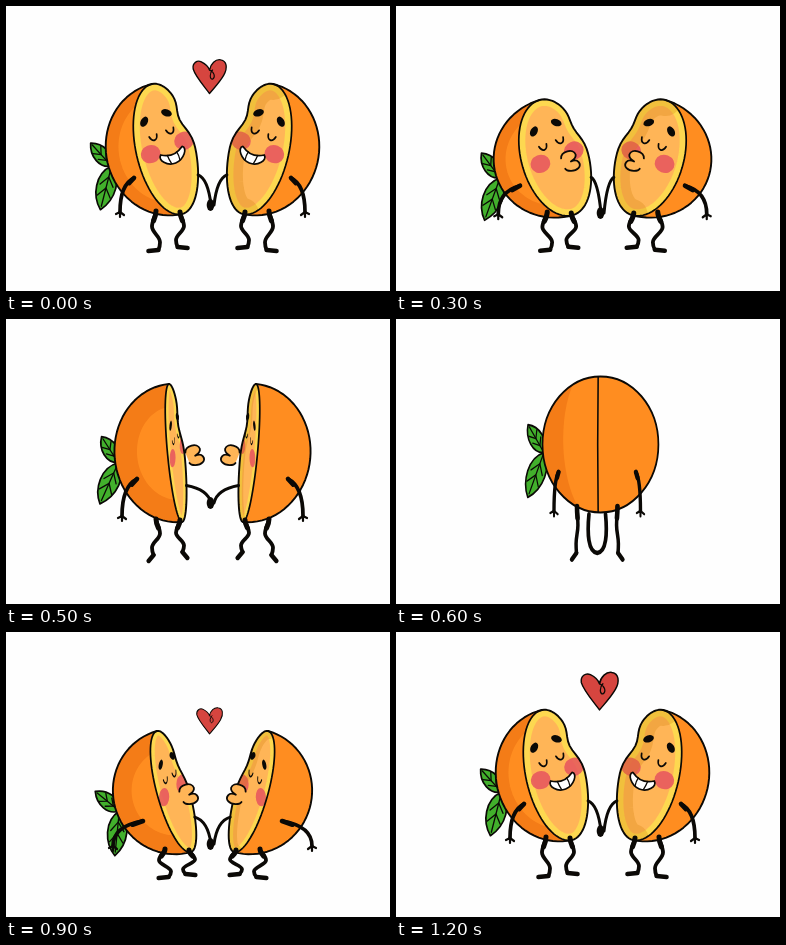
Recreate the animation shown at these times as an HTML page with a canvas. Size 384x285 px, loop 1.3 s.

```html
<!DOCTYPE html>
<html lang="en">
<head>
<meta charset="utf-8">
<title>Orange halves</title>
<style>
html, body { margin: 0; width: 100%; height: 100%; overflow: hidden; background: #fefefe; }
canvas { display: block; width: 100vw; height: 100vh; }
</style>
</head>
<body>
<canvas id="stage"></canvas>
<script>
const W = 384, H = 285, LOOP = 1300;
const INK = '#0b0906', ORANGE = '#ff8d20', SHADE = '#f47c17', YELLOW = '#fdd850', FLESH = '#ffb557',
  BLUSH = 'rgba(230, 80, 95, .82)', DIM = 'rgba(205, 125, 10, .27)', RED = '#d6453f', GREEN = '#42b02c';

const canvas = document.getElementById('stage');
const ctx = canvas.getContext('2d');
const ratio = window.devicePixelRatio || 1;
canvas.width = W * ratio;
canvas.height = H * ratio;

// A half is three arcs on one chord from top to bottom: back, rim of the cut, front with a dent.
// face: point between the eyes and how far it is turned to the viewer; stance: ground, knee bend.
const squat = {
  top: [146, 78], bottom: [176, 208], bulge: [61, 31, 28, 7], face: [156, 128, 1],
  shoulder: [128, 172], hand: [114, 206], clasp: [199], stance: [243, 4], tilt: [0]
};
const stand = {
  ...squat, top: [146, 74], bottom: [176, 204], bulge: [58, 30, 28, 7], face: [157, 124, 1],
  shoulder: [129, 171], hand: [121, 207], clasp: [197], stance: [244, .5]
};
const kiss = {
  top: [144, 90], bottom: [177, 208], bulge: [62, 34, 31, 5], face: [156, 135, 1],
  shoulder: [125, 178], hand: [106, 208], clasp: [205], stance: [243, 4], tilt: [.08]
};
const profile = {
  top: [163, 65], bottom: [176, 203], bulge: [61, 8, 9, 3], face: [170, 119, .3],
  shoulder: [131, 160], hand: [116, 197], clasp: [184], stance: [235, -4], tilt: [.17]
};
const lean = {
  top: [151, 99], bottom: [185, 220], bulge: [61, 17, 15, 3], face: [164, 145, .52],
  shoulder: [137, 189], hand: [107, 214], clasp: [212], stance: [244, 6], tilt: [-.15]
};
const mix = (a, b, k) => Object.fromEntries(Object.keys(a).map(key =>
  [key, a[key].map((v, i) => v + (b[key][i] - v) * k)]));
const wide = mix(stand, kiss, 1.25);

// when, what to draw, age of the rising heart
const steps = [
  [0, () => pair(squat, true), 2],
  [100, () => pair(squat, true), 3],
  [200, () => pair(stand, true), 4],
  [300, () => pair(wide, false)],
  [400, () => pair(kiss, false)],
  [500, () => pair(profile, false)],
  [600, () => ball(.92, 1.08)],
  [700, () => ball(1, 1)],
  [900, () => pair(lean, false), 0],
  [1000, () => pair(mix(lean, wide, .7), false), 1],
  [1100, () => pair(squat, true), 2],
  [1200, () => pair(squat, true), 3]
];

// Point on a bulging arc, u from 0 at the top to 1 at the bottom
function arcPoint({ top, bottom }, u, bulge, dent = 0) {
  const dx = bottom[0] - top[0], dy = bottom[1] - top[1], len = Math.hypot(dx, dy);
  const s = (1 - Math.cos(u * Math.PI)) / 2;
  const out = bulge * Math.sin(u * Math.PI) + dent * Math.exp(-(((s - .3) / .12) ** 2));
  return [top[0] + dx * s - dy / len * out, top[1] + dy * s + dx / len * out];
}
const arc = (pose, bulge, dent) =>
  Array.from({ length: 41 }, (_, i) => arcPoint(pose, i / 40, bulge, dent));

function line(pts, closed) {
  const path = new Path2D();
  pts.forEach(p => path.lineTo(...p));
  if (closed) path.closePath();
  return path;
}
const ring = (a, b) => line([...a, ...[...b].reverse()], true);

function stroke(path, width, color = INK) {
  ctx.lineWidth = width;
  ctx.strokeStyle = color;
  ctx.stroke(typeof path === 'string' ? new Path2D(path) : path);
}
function fill(path, color) {
  ctx.fillStyle = color;
  ctx.fill(path);
}
function oval(x, y, rx, ry, color, turn = 0) {
  const path = new Path2D();
  path.ellipse(x, y, rx, ry, turn, 0, Math.PI * 2);
  fill(path, color);
}
function local(draw, x, y, sx = 1, sy = sx, turn = 0) {
  ctx.save();
  ctx.translate(x, y);
  ctx.scale(sx, sy);
  ctx.rotate(turn);
  draw();
  ctx.restore();
}
function inside(path, draw) {
  ctx.save();
  ctx.clip(path);
  draw();
  ctx.restore();
}

function leaf(len, half, turn) {
  local(() => {
    const shape = new Path2D(
      `M0 0C${len * .2} ${-half * 1.4} ${len * .7} ${-half * 1.3} ${len} 0` +
      `C${len * .75} ${half * 1.2} ${len * .25} ${half * 1.5} 0 0Z`);
    fill(shape, GREEN);
    stroke(shape, 1.7);
    stroke(`M0 0H${len * .92}`, 1.3);
    for (const k of [.25, .5]) {
      stroke(`M${len * (k + .2)} ${-half * .7}L${len * k} 0L${len * (k + .2)} ${half * .7}`, 1.3);
    }
  }, 0, 0, 1, 1, turn);
}
function leaves(x, y, tilt) {
  local(() => {
    leaf(45, 9.5, 1.82);
    leaf(31, 7.5, -2.31);
  }, x, y, 1, 1, tilt);
}

function arm([x, y], [hx, hy]) {
  stroke(`M${x} ${y}Q${hx} ${y + (hy - y) * .2} ${hx} ${hy}`, 3.7);
  stroke(`M${x} ${y}L${x + (hx - x) * .35} ${y + (hy - y) * .15}`, 4.6);
  stroke(`M${hx - 4} ${hy + 2}L${hx} ${hy}v5M${hx} ${hy}l4 3`, 2.2);
}
// S-shaped leg; with a negative bend the feet hang
function leg(x, y, side, ground, bend) {
  const drop = ground - y, b = side * bend, foot = bend < 0 ? [5, 6] : [10, 1];
  stroke(`M${x} ${y}c0 ${drop * .1} ${b} ${drop * .25} ${b} ${drop * .4}` +
    `s${-2 * b} ${drop * .25} ${-2 * b} ${drop * .4}q0 ${drop * .1} ${b * .4} ${drop * .2}`, 3.8);
  stroke(`M${x} ${y}q0 ${drop * .1} ${b * .6} ${drop * .25}`, 5);
  stroke(`M${x - b * .6} ${ground}l${side * foot[0]} ${foot[1]}`, 4.4);
}

function onFace([x, y, w], draw) {
  local(draw, x, y, w, 1, -.38);
}
function features() {
  for (const side of [-1, 1]) {
    oval(side * 12, -18, 5.5, 3.5, INK, side * .7);
    stroke(`M${side * 9 - 4} -2q1 5 4 5t4 -5`, 1.7);
  }
}
function smile() {
  const grin = new Path2D('M-11-4Q0 4 12-4C17-1 9 9 0 9C-9 9-16 0-11-4Z');
  fill(grin, '#fff');
  stroke(grin, 1.7);
  stroke('M-5-1Q-5 4-4 8M5-1Q6 3 5 8', 1.3);
}
function pout() {
  const lips = new Path2D('M-8-4C-7-11 6-12 7-5C7-1 3 0 1 1C9-1 11 6 7 9C3 12-5 10-6 7');
  fill(lips, FLESH);
  stroke(lips, 1.8);
}

function half(pose, smiling, left) {
  const [depth, cutWidth, belly, dent] = pose.bulge, w = pose.face[2];
  const [bx, by] = pose.bottom, [clasp] = pose.clasp, [ground, bend] = pose.stance;
  const back = arc(pose, depth), rim = arc(pose, cutWidth), front = arc(pose, -belly, dent);
  const body = ring(back, front), cut = ring(rim, front);

  if (left) {
    const [x, y] = arcPoint(pose, .52, depth - 3);
    leaves(x, y, pose.tilt[0]);
  }
  fill(body, ORANGE);
  if (left) inside(body, () => stroke(line(back), (depth - cutWidth) * .85, SHADE));
  inside(cut, () => {
    fill(cut, FLESH);
    stroke(cut, 4 + 9 * w, YELLOW);
    onFace(pose.face, () => [-18, 18].forEach(x => oval(x, 14.5, 10, 9, BLUSH)));
    if (!left) stroke(line(front), 32 * w, DIM);
  });
  stroke(line(rim), 1.7);
  stroke(body, 1.9);
  onFace(pose.face, features);
  if (smiling) onFace(pose.face, () => local(smile, 2, 23));
  else local(pout, pose.face[0] + 18, pose.face[1] + 17, 1, 1, -.2);

  leg(bx - 26, by - 3, -1, ground + 1, bend);
  leg(bx - 2, by - 2, 1, ground - 2, bend);
  arm(pose.shoulder, pose.hand);
  const [x, y] = arcPoint(pose, .66, -belly);
  stroke(`M${x} ${y}Q202 ${y + 4} 205 ${clasp}`, 3);
}

function pair(pose, smiling) {
  half(pose, smiling, true);
  local(() => half(pose, smiling, false), 413, 0, -1, 1);
  oval(204.5, pose.clasp[0], 3.8, 6, INK);
}

// Both halves closed to a whole fruit
function ball(sx, sy) {
  local(() => {
    ctx.translate(-204, -126);
    leaves(143, 133, .15);
    const fruit = new Path2D();
    fruit.ellipse(204.5, 125.5, 63, 63, 0, 0, Math.PI * 2);
    fill(fruit, SHADE);
    inside(fruit, () => fill(new Path2D('M186 55C156 80 156 165 190 195H280V55Z'), ORANGE));
    stroke(fruit, 1.9);
    stroke('M202 63Q201 125 202 188', 1.7);
    stroke('M192 190C190 208 191 225 201 226C211 225 212 208 210 190', 4);
    for (const side of [-1, 1]) {
      leg(201 + side * 22, 183, side, 226, -1);
      arm([201 + side * 42, 151], [201 + side * 47, 187]);
    }
  }, 204, 126, sx, sy);
}

function heart() {
  const shape = new Path2D(
    'M0 34C-6 26-14 17-16 10C-17 4-12 1-8 3C-4 5-1 8 0 11C1 5 6 0 11 1C17 2 18 9 14 16C10 23 5 28 0 34Z');
  fill(shape, RED);
  stroke(shape, 1.3);
  stroke('M0 11C5 13 6 18 3 20C0 20 0 14 3 11', 1.1);
}

function frame() {
  const t = performance.now() % LOOP;
  const [, draw, age] = steps.filter(s => s[0] <= t).pop();
  ctx.setTransform(ratio, 0, 0, ratio, 0, 0);
  ctx.fillStyle = '#fefefe';
  ctx.fillRect(0, 0, W, H);
  ctx.lineCap = ctx.lineJoin = 'round';
  draw();
  if (age !== undefined) local(heart, 203.5, 75 - 9.5 * age - .8 * age * age, .79 + .115 * age);
  requestAnimationFrame(frame);
}
frame();
</script>
</body>
</html>
```
